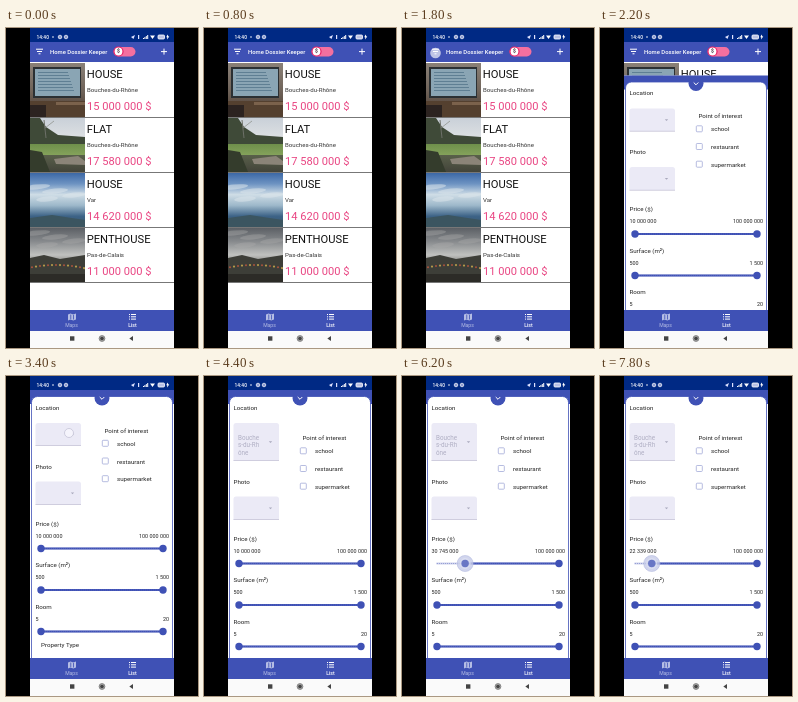
Recreate the animation shown at these times as an HTML page with a canvas. Size 192 by 320 pixels, loop 8000 ms.

```html
<!DOCTYPE html>
<html lang="en">
<head>
<meta charset="utf-8">
<title>Property list</title>
<style>
html, body { margin: 0; width: 100%; height: 100%; overflow: hidden; background: #000; }
canvas { display: block; width: 192px; height: 320px; }
</style>
</head>
<body>
<canvas id="stage"></canvas>
<script>
const W = 192, H = 320, LOOP = 8000, STEP = 200;
const LEFT = 24, RIGHT = 168;
const BLUE = '#3f51b5', NAVY = '#002984', PINK = '#e94683', FIELD = '#ebeaf6', INK = '#222';
const canvas = document.getElementById('stage');
const ctx = canvas.getContext('2d');
const dpr = window.devicePixelRatio || 1;
canvas.width = W * dpr;
canvas.height = H * dpr;

const clamp = (v) => Math.max(0, Math.min(1, v));
const easeOut = (v) => 1 - (1 - v) ** 3;

// Linear interpolation through [time, value] keys.
function track(keys, t) {
  if (t <= keys[0][0]) return keys[0][1];
  for (let i = 1; i < keys.length; i++) {
    const [t0, a] = keys[i - 1], [t1, b] = keys[i];
    if (t <= t1) return a + (b - a) * (t - t0) / (t1 - t0);
  }
  return keys[keys.length - 1][1];
}

function rect(x, y, w, h, fill) {
  ctx.fillStyle = fill;
  ctx.fillRect(x, y, w, h);
}

function round(x, y, w, h, r, fill, stroke) {
  ctx.beginPath();
  ctx.roundRect(x, y, w, h, r);
  if (fill) { ctx.fillStyle = fill; ctx.fill(); }
  if (stroke) { ctx.strokeStyle = stroke; ctx.lineWidth = 0.8; ctx.stroke(); }
}

function disc(x, y, r, fill, stroke, width = 0.8) {
  ctx.beginPath();
  ctx.arc(x, y, r, 0, Math.PI * 2);
  if (fill) { ctx.fillStyle = fill; ctx.fill(); }
  if (stroke) { ctx.strokeStyle = stroke; ctx.lineWidth = width; ctx.stroke(); }
}

function poly(points, fill) {
  ctx.beginPath();
  points.forEach(([x, y]) => ctx.lineTo(x, y));
  ctx.fillStyle = fill;
  ctx.fill();
}

function line(points, color, width = 1) {
  ctx.beginPath();
  points.forEach(([x, y]) => ctx.lineTo(x, y));
  ctx.strokeStyle = color;
  ctx.lineWidth = width;
  ctx.stroke();
}

// Text placed by the middle of its capitals.
function text(str, x, y, size, color = INK, align = 'left', weight = 400) {
  ctx.font = `${weight} ${size}px Roboto, sans-serif`;
  ctx.textAlign = align;
  ctx.fillStyle = color;
  ctx.fillText(str, x, y + size * 0.355);
}

function fade(y, h, colors) {
  const g = ctx.createLinearGradient(0, y, 0, y + h);
  colors.forEach((c, i) => g.addColorStop(i / (colors.length - 1), c));
  rect(0, y, 55, h, g);
}

function clouds(y, color, count) {
  ctx.fillStyle = color;
  for (let i = 0; i < count; i++) {
    ctx.beginPath();
    ctx.ellipse(6 + (i * 19) % 46, y + i * 4, 14 - i, 2.4, -0.1, 0, Math.PI * 2);
    ctx.fill();
  }
}

// Each scene fills a 55 by 54 box.
const photos = [
  () => {
    fade(0, 54, ['#8a8178', '#70645a', '#4a3a30']);
    rect(3, 4, 48, 31, '#2b3033');
    rect(5, 6, 45, 27, '#8aa5b4');
    for (let i = 0; i < 7; i++) rect(8, 9 + i * 3, 30 + (i * 11) % 10, 1, '#5f7f93');
    rect(0, 38, 55, 16, '#54402f');
    rect(0, 42, 16, 12, '#2c2320');
    rect(26, 39, 29, 3, '#7b624c');
  },
  () => {
    fade(0, 26, ['#c9d0d8', '#e3e5e6']);
    poly([[0, 0], [10, 0], [16, 9], [28, 17], [55, 19], [55, 28], [0, 28]], '#3f4a38');
    line([[16, 20], [14, 2]], '#6d7068');
    line([[15, 10], [24, 3]], '#888b84', 0.7);
    fade(26, 12, ['#6f8f4b', '#86a45c']);
    fade(37, 17, ['#59604a', '#43443a']);
    poly([[0, 32], [12, 34], [20, 54], [0, 54]], '#343c2c');
    poly([[24, 41], [48, 38], [55, 43], [55, 47], [26, 46]], '#8b8478');
  },
  () => {
    fade(0, 54, ['#3c68a6', '#6d93c2', '#cfdde6', '#9db8ca', '#3d6387', '#38566a']);
    clouds(14, '#dbe5ea88', 4);
    poly([[0, 45], [22, 42], [55, 47], [55, 54], [0, 54]], '#3b5560');
  },
  () => {
    fade(0, 54, ['#5c6065', '#878a8d', '#c0c1bf', '#5c5b54', '#2f302c']);
    clouds(5, '#a9abab66', 4);
    poly([[0, 30], [14, 27], [30, 31], [55, 27], [55, 54], [0, 54]], '#3d3e38');
    for (let i = 0; i < 14; i++) {
      disc(2 + i * 4, 37 + ((i - 6) / 4) ** 2, 1.1, i % 2 ? '#b39a4b' : '#a3523d');
    }
    rect(0, 46, 55, 8, '#2c2b27');
  }
];

const homes = [
  ['HOUSE', 'Bouches-du-Rhône', '15 000 000 $'],
  ['FLAT', 'Bouches-du-Rhône', '17 580 000 $'],
  ['HOUSE', 'Var', '14 620 000 $'],
  ['PENTHOUSE', 'Pas-de-Calais', '11 000 000 $']
];

function statusBar() {
  rect(LEFT, 0, RIGHT - LEFT, 14, NAVY);
  text('14:40', 30.5, 9, 4.9, '#fff', 'left', 500);
  disc(47, 9, 0.8, '#fff');
  disc(54, 9, 1.8, '#8f9cd0', '#fff', 0.7);
  disc(60, 9, 1.8, '#8f9cd0', '#fff', 0.7);
  poly([[125, 9], [129, 7], [127.5, 11]], '#dfe3ff');
  rect(132, 7, 1.2, 4, '#dfe3ff');
  for (let i = 0; i < 4; i++) rect(137 + i * 1.4, 10 - i, 1, 1 + i, '#fff');
  poly([[144, 7.5], [149, 7.5], [146.5, 11]], '#fff');
  round(152, 7, 6.5, 4, 1, '#b9c1e4', '#fff');
  poly([[161.5, 6.5], [162.5, 8.5], [163.3, 8.5], [161, 11.5], [161.3, 9.3], [160.3, 9.3]], '#fff');
}

function appBar(pressed) {
  rect(LEFT, 14, RIGHT - LEFT, 20, BLUE);
  if (pressed) disc(33.5, 25, 5.3, '#bec4e6');
  [7, 5, 2].forEach((w, i) => rect(33.5 - w / 2, 20.7 + i * 2.3, w, 1, '#fff'));
  text('Home Dossier Keeper', 44, 23.7, 5.9, '#fff', 'left', 500);
  round(107.5, 19, 22, 9.5, 4.75, '#f4709f');
  disc(112.5, 23.5, 5.1, '#e91e63');
  disc(112.5, 23.5, 3.9, '#fff');
  text('$', 112.5, 23.5, 5, '#4a3040', 'center', 700);
  rect(155, 23.1, 6, 1, '#fff');
  rect(157.5, 20.6, 1, 6, '#fff');
}

function photo(scene, x, y) {
  ctx.save();
  ctx.translate(x, y);
  ctx.beginPath();
  ctx.rect(0, 0, 55, 54);
  ctx.clip();
  scene();
  ctx.restore();
}

function homeList() {
  homes.forEach(([kind, place, price], i) => {
    const y = 35 + i * 55;
    photo(photos[i], LEFT, y);
    text(kind, 80.7, y + 11.5, 11.2, '#111');
    text(place, 81, y + 27, 6.1, '#333');
    text(price, 81, y + 43.5, 11.1, PINK);
    rect(LEFT, y + 54, RIGHT - LEFT, 1, '#777');
  });
}

function caret(x, y) {
  poly([[x - 1.7, y - 0.8], [x + 1.7, y - 0.8], [x, y + 1]], '#aaaabd');
}

function field(y, h) {
  round(29.5, y, 45.5, h, [2.5, 2.5, 0, 0], FIELD);
  rect(29.5, y + h - 0.7, 45.5, 0.7, '#c3c2d4');
  caret(66.5, y + h / 2);
}

function slider(y, label, low, high, from = 35) {
  text(label, 29.5, y - 25, 6.2);
  text(low, 29.5, y - 12.5, 5.4);
  text(high, 163, y - 12.5, 5.4, INK, 'right');
  round(34, y - 1, 124, 2, 1, '#cdd1ec');
  for (let x = 35; x < 157; x += 2) rect(x, y - 0.4, 0.8, 0.8, '#7783c9');
  rect(from, y - 1, 157 - from, 2, BLUE);
  for (let x = Math.ceil(from); x < 157; x += 2) rect(x, y - 0.3, 0.6, 0.6, '#7380cb');
  disc(157, y, 3.7, BLUE);
  if (from > 35) disc(from, y, 8, '#c6cbe8cc', '#b4bbe0', 0.6);
  disc(from, y, 3.7, BLUE);
  if (from > 35) disc(from, y, 5, '#dfe2f344', '#dfe2f3');
}

function menu() {
  ctx.save();
  ctx.shadowColor = '#0005';
  ctx.shadowBlur = 4;
  round(29.5, 71, 47, 76, 1.5, '#fff');
  ctx.restore();
  ['Bouche', 's-du-Rh', 'ône', 'Pas-de-', 'Calais', 'Var'].forEach((s, i) => {
    const gap = i > 4 ? 10 : i > 2 ? 5 : 0;
    text(s, 34, 80 + i * 8 + gap, 6.2);
  });
}

function filterSheet(t, top) {
  const chosen = t >= 4400;
  const shift = chosen ? 15 : 0;
  const price = track([[5200, 10e6], [6200, 30745e3], [7800, 22339e3]], t);
  const amount = String(Math.round(price / 1000) * 1000).replace(/\B(?=(\d{3})+$)/g, ' ');

  ctx.save();
  ctx.beginPath();
  ctx.rect(LEFT, 14, RIGHT - LEFT, 268);
  ctx.clip();
  ctx.translate(0, top);
  rect(LEFT, 14, RIGHT - LEFT, 268, '#fff');
  rect(LEFT, 14, RIGHT - LEFT, 14, BLUE);
  round(25.5, 20.5, 141, 275, 6, '#fff', BLUE);
  disc(96, 22, 7.5, BLUE);
  line([[93.7, 21], [96, 23.3], [98.3, 21]], '#fff', 1);

  text('Location', 29.5, 31.5, 6.2);
  field(47, chosen ? 38 : 23);
  if (chosen) ['Bouche', 's-du-Rh', 'ône'].forEach((s, i) => text(s, 34, 61.5 + i * 7.7, 6.3, '#b0afc4'));
  if (t >= 3200 && t < 3600) disc(63, 57, 4.5, '#f5f4fc', '#c4c3d6');

  text('Point of interest', 98.5, 54.5 + shift / 2, 6.2);
  ['school', 'restaurant', 'supermarket'].forEach((s, i) => {
    const y = 67.3 + i * 17.7 + shift / 2;
    round(96.3, y - 3, 6, 6, 0.8, '#fff', '#a4abd9');
    text(s, 111, y + 0.3, 6.2);
  });

  text('Photo', 29.5, 90.5 + shift, 6.2);
  field(105.5 + shift, 23.5);
  slider(172.5 + shift, 'Price ($)', amount, '100 000 000', 35 + (price - 10e6) / 90e6 * 122);
  slider(214 + shift, 'Surface (m²)', '500', '1 500');
  slider(255.5 + shift, 'Room', '5', '20');
  text('Property Type', 35, 268.5 + shift, 6.2);
  if (t >= 3600 && t < 4400) menu();
  ctx.restore();
}

function bottomBars() {
  const dim = '#b5bde4';
  rect(LEFT, 282, RIGHT - LEFT, 21, BLUE);
  poly([[62, 286.5], [64.5, 285.5], [67.3, 286.5], [70, 285.5], [70, 291.5], [67.3, 292.5], [64.5, 291.5], [62, 292.5]], dim);
  rect(64.4, 286.5, 0.8, 4.5, BLUE);
  rect(67, 287, 0.8, 4.5, BLUE);
  text('Maps', 65.5, 297.5, 5.1, dim, 'center');
  for (let i = 0; i < 3; i++) {
    rect(123, 286 + i * 2.3, 1, 1, '#fff');
    rect(125, 286 + i * 2.3, 5, 1, '#fff');
  }
  text('List', 126.5, 297.5, 5.1, '#fff', 'center', 500);
  rect(LEFT, 303, RIGHT - LEFT, 17, '#fafafa');
  rect(64, 308.3, 4.4, 4.4, '#444');
  disc(96, 310.5, 2.9, '#aaa', '#777');
  disc(96, 310.5, 1.8, '#444');
  poly([[127, 308], [127, 313], [123.3, 310.5]], '#444');
}

function draw(t) {
  ctx.setTransform(dpr, 0, 0, dpr, 0, 0);
  rect(0, 0, W, H, '#000');
  rect(LEFT, 0, RIGHT - LEFT, H, '#fff');
  statusBar();
  appBar(t >= 1600 && t < 2200);
  homeList();
  const open = easeOut(clamp((t - 1800) / 800));
  if (open > 0) filterSheet(t, 268 * (1 - open));
  bottomBars();
}

const start = performance.now();
function tick() {
  const t = (performance.now() - start) % LOOP;
  draw(Math.floor(t / STEP) * STEP);
  requestAnimationFrame(tick);
}
tick();
</script>
</body>
</html>
```
